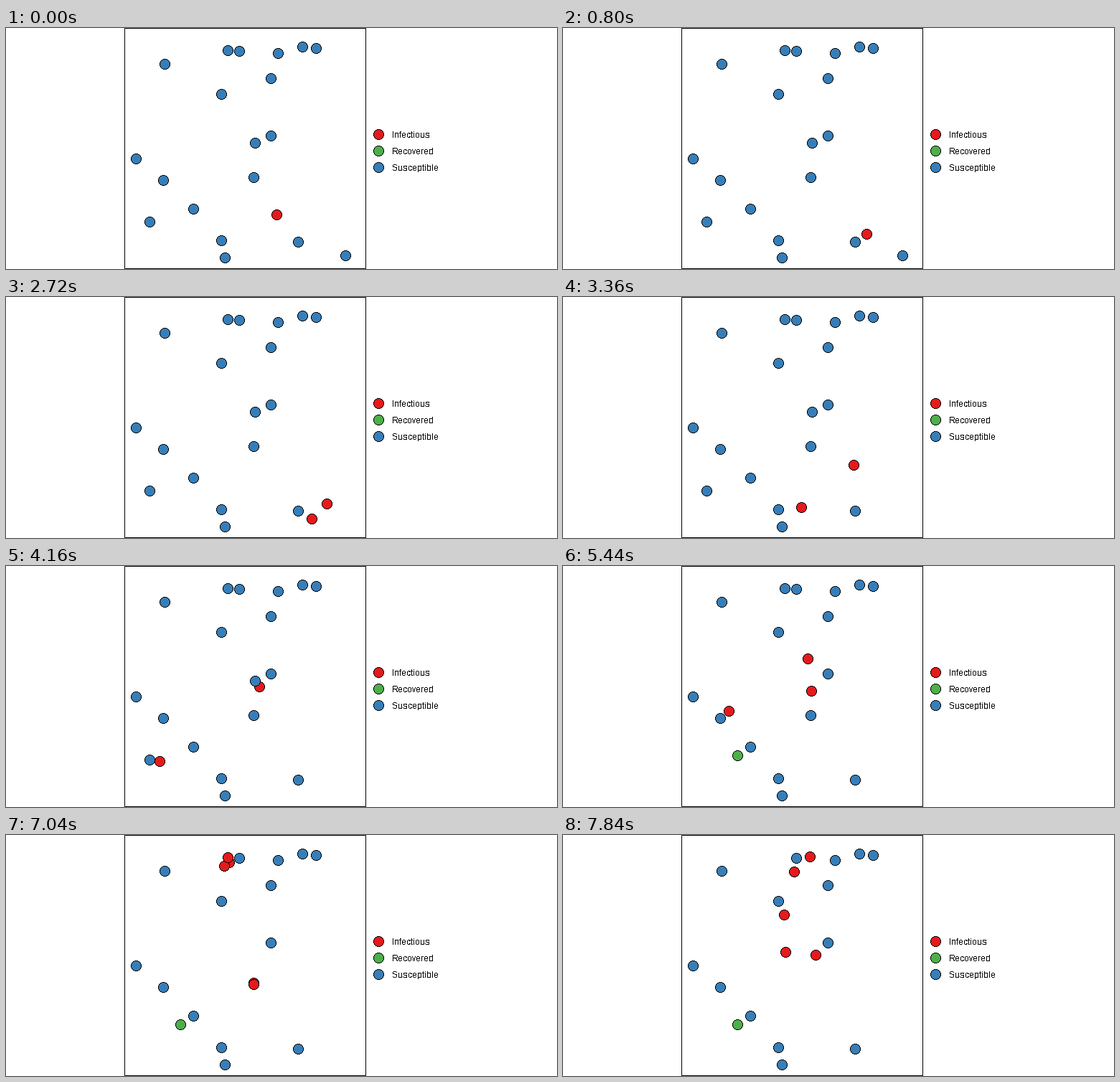
Animation of 768x336 px, one loop 8000 ms. Source, as a matplotlib script:

```python
import numpy as np
import matplotlib.pyplot as plt
from matplotlib.animation import FuncAnimation
from matplotlib.patches import Circle, Rectangle

W, H, DPI = 768, 336, 100
PX = 72 / DPI  # points per pixel
FRAMES, STEP_MS = 50, 160
RED, GREEN, BLUE = "#E41A1C", "#4DAF4A", "#377EB8"

# Agent 0 is infectious at first; those it and its victims visit come next.
HOMES = np.array([
    (377, 260), (473, 317), (347, 160), (200, 270), (309, 31),
    (345, 208), (300, 296), (369, 70), (432, 28), (221, 50),
    (325, 32), (379, 35), (413, 26), (300, 92), (369, 150),
    (181, 182), (219, 212), (261, 252), (305, 320), (407, 298),
], dtype=float)

# Who each sick agent visits, round by round
VISITS = [[1], [2, 3], [4, 5, 4], [6, 7, 7, 8, 9]]
ROUND, TRIP, PAUSE = 15.4, 10.3, 5  # lengths in frames
REACH = 0.95                        # a trip stops just short of its goal
HEALER, HEAL_ROUND, REST = 1, 1, (243, 264)

plt.rcParams.update({
    "font.family": "Liberation Sans",
    "font.size": 12 * PX,
    "text.hinting": "native",
    "text.hinting_factor": 1,
    "text.antialiased": False,
})


def simulate(n):
    """Positions and colours of all agents at frame n."""
    pos = HOMES.copy()
    fills = [RED] + [BLUE] * (len(HOMES) - 1)
    for k, goals in enumerate(VISITS):
        start, end = round(ROUND * k), round(ROUND * k + TRIP)
        if n <= start:
            break
        t = min((n - start) / (end - start), 1)
        sick = [i for i, fill in enumerate(fills) if fill == RED]
        for agent, goal in zip(sick, goals):
            pos[agent] += t * REACH * (HOMES[goal] - pos[agent])
        if n > end:
            for goal in goals:
                fills[goal] = RED
            if k == HEAL_ROUND:
                fills[HEALER] = GREEN
                pos[HEALER] += min((n - end) / PAUSE, 1) * (REST - pos[HEALER])
    return np.round(pos), fills


class Dot:
    """A disc of 15 pixels with a hard one-pixel rim."""

    def __init__(self, ax):
        self.discs = [ax.add_patch(Circle((0, 0), r, linewidth=0, color="black",
                                          antialiased=False))
                      for r in (6.9, 5.9)]

    def set(self, xy, fill, level=0):
        for step, disc in enumerate(self.discs):
            disc.center = xy[0] + 0.5, xy[1] + 0.5
            disc.set_zorder(3 + level + step / 2)
        self.discs[1].set_facecolor(fill)


fig = plt.figure(figsize=(W / DPI, H / DPI), dpi=DPI, facecolor="white")
ax = fig.add_axes([0, 0, 1, 1])
ax.set(xlim=(0, W), ylim=(H, 0))
ax.axis("off")
ax.add_patch(Rectangle((165.5, 0.5), 336, 335, fill=False, edgecolor="black",
                       linewidth=PX, snap=False))

legend = [("Infectious", RED), ("Recovered", GREEN), ("Susceptible", BLUE)]
for row, (label, fill) in enumerate(legend):
    y = 148 + 23 * row
    Dot(ax).set((519, y), fill)
    ax.text(538, y + 5, label, va="baseline")

dots = [Dot(ax) for _ in HOMES]


def draw(n):
    pos, fills = simulate(n)
    for i, dot in enumerate(dots):
        on_top = len(dots) if fills[i] == BLUE else 0
        dot.set(pos[i], fills[i], i + on_top)
    return [disc for dot in dots for disc in dot.discs]


anim = FuncAnimation(fig, draw, frames=FRAMES, interval=STEP_MS,
                     repeat=True, repeat_delay=0)
plt.show()
```
